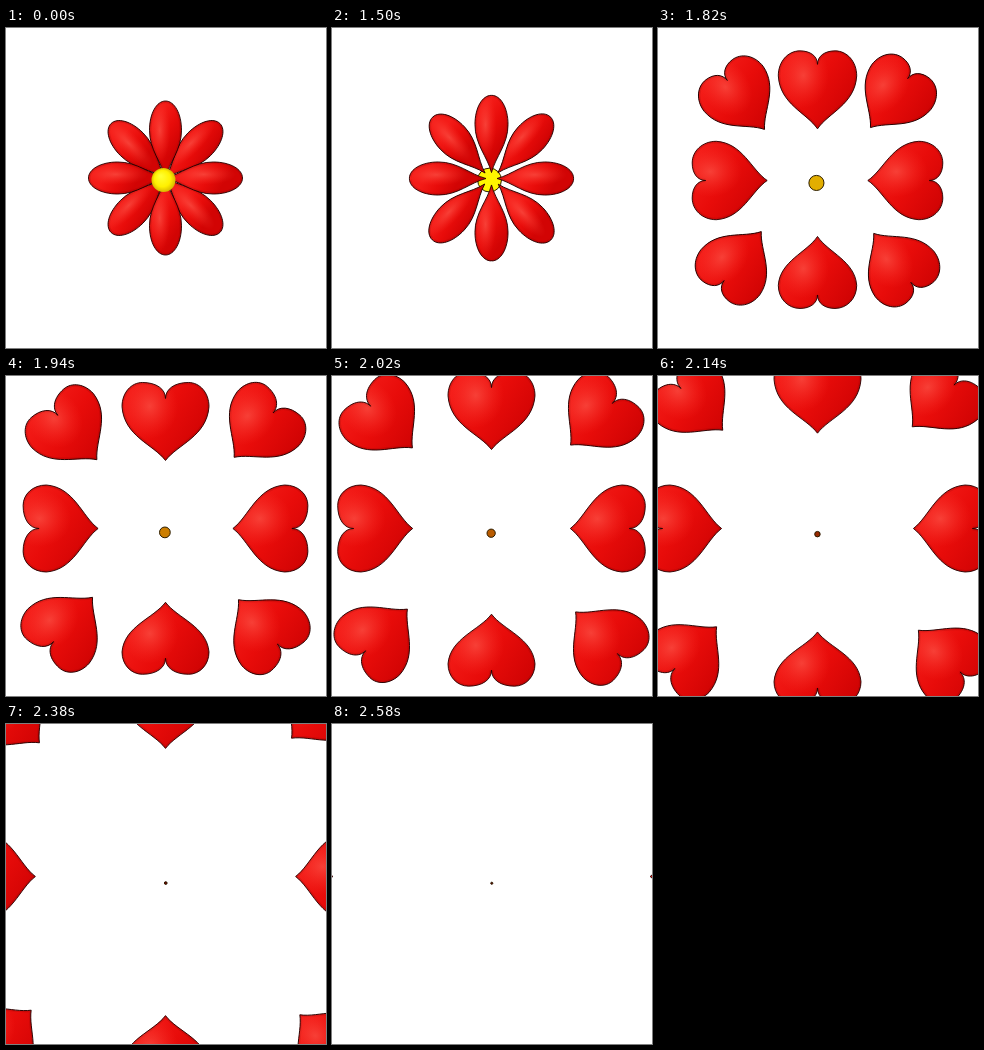
Animation of 320 by 320 pixels, one loop 2620 ms. Source, as an HTML page with a canvas:

```html
<!DOCTYPE html>
<html lang="en">
<head>
<meta charset="utf-8">
<title>Flower of hearts</title>
<style>
  html, body { margin: 0; width: 100%; height: 100%; overflow: hidden; background: #fff; }
  canvas { display: block; width: 100vw; height: 100vh; }
</style>
</head>
<body>
<canvas id="stage" width="320" height="320"></canvas>
<script>
const ctx = document.getElementById('stage').getContext('2d');
const LOOP = 2620, REST = 1500, STEP = 40;

const mix = (a, b, t) => a + (b - a) * t;
const clamp = t => Math.min(1, Math.max(0, t));
const smooth = t => t * t * (3 - 2 * t);

// Eight directions around the centre, diagonals first
const petals = [];
for (const sy of [-1, 0, 1]) {
  for (const sx of [-1, 0, 1]) {
    if (sx || sy) petals.push({ sx, sy, diagonal: sx * sy !== 0 });
  }
}
petals.sort((a, b) => b.diagonal - a.diagonal);

// Tips fly straight outwards, slightly faster towards the bottom
function tipOf({ sx, sy, diagonal }, k) {
  const lead = clamp(k / 5);
  const dx = diagonal ? (5.4 + .18 * sy) * k + 6 * lead : 5.7 * k - lead;
  const dy = diagonal ? (6 + .1 * sx) * k - 2 * lead : (5.7 + .24 * sy) * k + 2.5 * lead;
  return [159.5 + sx * dx, 150 + 2.5 * lead + sy * dy];
}

// Petal at m = 0, heart at m = 1; tip at the origin, axis along x
function outline(m, w, len) {
  const wide = len * mix(.62, .69, m);
  const lobe = 23 * m * w / 43.5;
  const cleft = len - 16 * m;
  const shoulder = mix(wide, len, .58);
  const inner = mix(cleft, len, .6);
  const bulge = mix(lobe, w, .55);
  const p = new Path2D();
  p.moveTo(0, 0);
  p.bezierCurveTo(16, mix(4, 12, m), mix(28, 24, m), w * mix(1, .95, m), wide, w);
  p.bezierCurveTo(shoulder, w, len, bulge, len, lobe);
  p.bezierCurveTo(len, lobe * .4, inner, 0, cleft, 0);
  p.bezierCurveTo(inner, 0, len, -lobe * .4, len, -lobe);
  p.bezierCurveTo(len, -bulge, shoulder, -w, wide, -w);
  p.bezierCurveTo(mix(28, 24, m), -w * mix(1, .95, m), 16, -mix(4, 12, m), 0, 0);
  p.closePath();
  return p;
}

function shade(path, w, len, angle) {
  // light from the upper left of the stage, in petal coordinates
  const c = Math.cos(angle), s = Math.sin(angle);
  const lu = -.8 * c - .5 * s, lv = .8 * s - .5 * c;
  const mid = len * .57;
  const base = ctx.createLinearGradient(mid + lu * w, lv * w, mid - lu * w, -lv * w);
  base.addColorStop(0, '#f41c18');
  base.addColorStop(.5, '#e80c0a');
  base.addColorStop(1, '#d20404');
  ctx.fillStyle = base;
  ctx.fill(path);

  ctx.save();
  ctx.clip(path);
  ctx.lineWidth = 4;
  ctx.strokeStyle = 'rgba(120,0,0,.18)';
  ctx.stroke(path);
  ctx.translate(mid + lu * w * .45, lv * w * .45);
  ctx.scale(len * .42, w * .65);
  const glow = ctx.createRadialGradient(0, 0, 0, 0, 0, 1);
  glow.addColorStop(0, 'rgba(255,100,86,.55)');
  glow.addColorStop(1, 'rgba(255,60,50,0)');
  ctx.fillStyle = glow;
  ctx.fillRect(-1, -1, 2, 2);
  ctx.restore();
}

function drawPetal(petal, k) {
  const { sx, sy, diagonal } = petal;
  const m = smooth(clamp(k / 12));
  // diagonal hearts swing towards the vertical and back while they open
  const swing = sx * sy * .15 * Math.sin(Math.PI * clamp(k / 14));
  const angle = Math.atan2(sy, sx) + swing;
  const len = mix(77, diagonal ? 75 : 75 - 3 * sy, clamp(k / 5));
  const w = mix(16, diagonal ? 41 : 43.5, m);
  const path = outline(m, w, len);

  ctx.save();
  ctx.translate(...tipOf(petal, k));
  ctx.rotate(angle);
  shade(path, w, len, angle);
  ctx.lineWidth = .9;
  ctx.lineJoin = 'round';
  ctx.strokeStyle = '#240000';
  ctx.stroke(path);
  ctx.restore();
}

function drawBall(k) {
  const size = Math.exp(-((k / 12.5) ** 2));
  const age = clamp(k / 20) ** 2;
  const x = mix(159.8, 157.5, size), y = mix(159.3, 152, size);
  const r = mix(1, 12, size);
  ctx.beginPath();
  ctx.arc(x, y, r, 0, Math.PI * 2);
  if (k === 0) {
    const g = ctx.createRadialGradient(x - 3, y - 4, 1, x, y, r);
    g.addColorStop(0, '#ffff30');
    g.addColorStop(.65, '#fff000');
    g.addColorStop(1, '#d8b800');
    ctx.fillStyle = g;
    ctx.fill();
    return;
  }
  ctx.fillStyle = `hsl(${58 * (1 - age)}, 100%, ${50 - 28 * age}%)`;
  ctx.fill();
  ctx.lineWidth = 1;
  ctx.strokeStyle = '#2a1c00';
  ctx.stroke();
}

function draw(time) {
  const t = time % LOOP;
  const k = t < REST ? 0 : Math.floor((t - REST) / STEP) + 1;
  ctx.fillStyle = '#fff';
  ctx.fillRect(0, 0, 320, 320);
  if (k > 0) drawBall(k);
  for (const petal of petals) drawPetal(petal, k);
  if (k === 0) drawBall(k);
}

const begin = performance.now();
function tick() {
  draw(performance.now() - begin);
  requestAnimationFrame(tick);
}
tick();
</script>
</body>
</html>
```
